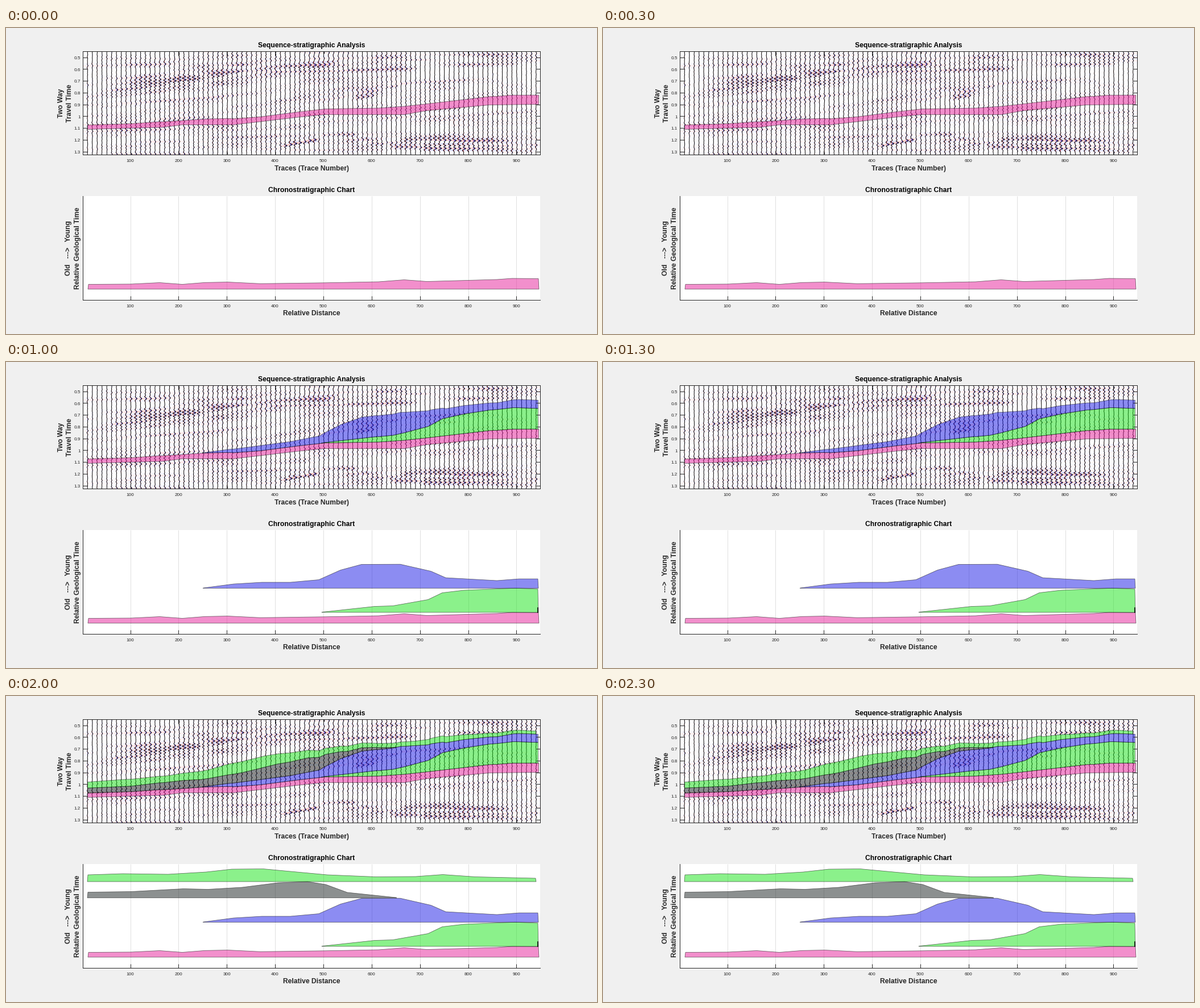
These frames come from a looping animation (1039x539 px, 2.5 s). A matplotlib script:

```python
import numpy as np
import matplotlib.pyplot as plt
from matplotlib.animation import FuncAnimation

W, H, DPI = 1039, 539, 64
PT = 72 / DPI  # points per pixel
INK = "#262626"
LEFT, RIGHT = 135, 939
SECTION_Y, CHART_Y = (41, 223), (296, 479)
X_TICKS = 218.5 + 84.87 * np.arange(9)
Y_TICKS = 51.5 + 20.75 * np.arange(9)
CHART_SCALE = 1.13  # chart height per pixel of section thickness

plt.rcParams["font.family"] = "Liberation Sans"
fig = plt.figure(figsize=(W / DPI, H / DPI), dpi=DPI, facecolor="#f0f0f0")
rng = np.random.default_rng(7)


def panel(top, bottom):
    """Axes whose data coordinates are stage pixels."""
    ax = fig.add_axes([LEFT / W, 1 - bottom / H, (RIGHT - LEFT) / W, (bottom - top) / H])
    ax.set(xlim=(LEFT, RIGHT), ylim=(bottom, top), xticks=X_TICKS, yticks=[])
    ax.set_autoscale_on(False)
    ax.set_axisbelow(False)
    ax.tick_params(direction="in", length=7.5 * PT, width=PT, color=INK,
                   labelbottom=False, labelleft=False)
    for spine in ax.spines.values():
        spine.set(color=INK, linewidth=PT)
    return ax


def label(x, y, text, size=12.12, color=INK, weight="bold", ha="center", rotation=0):
    fig.text(x / W, 1 - y / H, text, fontsize=size * PT, color=color, weight=weight,
             ha=ha, va="baseline", rotation=rotation, rotation_mode="anchor")


section = panel(*SECTION_Y)
section.set_yticks(Y_TICKS)
section.tick_params(top=True, right=True)
chart = panel(*CHART_Y)
chart.spines[["top", "right"]].set_visible(False)
chart.vlines(X_TICKS, *CHART_Y, color="#dfdfdf", lw=PT, zorder=0.5)

label(537.5, 34, "Sequence-stratigraphic Analysis", color="black")
label(537.5, 251, "Traces (Trace Number)")
label(537.5, 289, "Chronostratigraphic Chart", color="black")
label(537.5, 506.5, "Relative Distance")
label(100, 132.5, "Two Way", rotation=90)
label(114.8, 132.5, "Travel Time", rotation=90)
label(113.3, 387.5, "Old   --->   Young", rotation=90)
label(128.5, 387.5, "Relative Geological Time", rotation=90)
for i, (x, y) in enumerate(zip(X_TICKS, Y_TICKS)):
    for baseline in (235.6, 491.6):
        label(x, baseline, f"{100 * (i + 1)}", 8.1, weight="normal")
    label(131, y + 3.4, f"{0.5 + 0.1 * i:.2g}", 8.1, weight="normal", ha="right")


def spread_reflectors(count, start, end, scatter, strength):
    """Short parallel reflectors strewn along the line from start to end."""
    (x0, y0), (x1, y1) = start, end
    slope = (y1 - y0) / (x1 - x0)
    for _ in range(count):
        half = (x1 - x0) * rng.uniform(0.15, 0.4)
        x = rng.uniform(x0 + half, x1 - half)
        y = y0 + slope * (x - x0) + rng.uniform(-scatter, scatter)
        yield x, y, half, slope, strength * rng.uniform(0.6, 1.1)


reflectors = [
    *spread_reflectors(16, (130, 112), (450, 76), 16, 0.42),
    *spread_reflectors(9, (390, 77), (740, 70), 9, 0.4),
    *spread_reflectors(3, (500, 65), (600, 61), 4, 0.6),
    *spread_reflectors(5, (580, 123), (700, 106), 6, 0.65),
    *spread_reflectors(4, (460, 214), (570, 191), 4, 0.6),
    *spread_reflectors(4, (550, 189), (690, 206), 4, 0.45),
    *spread_reflectors(12, (670, 204), (950, 207), 9, 0.55),
]
for _ in range(300):
    y = rng.uniform(*SECTION_Y)
    dip = -0.07 * np.exp(-((y - 125) / 50) ** 2)
    reflectors.append((rng.uniform(LEFT, RIGHT), y, rng.uniform(20, 100), dip,
                       rng.uniform(0.08, 0.3)))


def amplitude(x, y):
    """Reflection strength on the grid of columns x and rows y."""
    total = np.zeros((len(y), len(x)))
    for cx, cy, half, slope, strength in reflectors:
        offset = y[:, None] - cy - slope * (x - cx)
        taper = np.clip((half - abs(x - cx)) / 12, 0, 1)
        total += strength * taper * np.exp(-(offset / 4) ** 2) * np.cos(0.9 * offset)
    return np.clip(total, -0.9, 0.9)


rows = np.arange(SECTION_Y[0], SECTION_Y[1] + 0.5, 0.5)
columns = np.arange(LEFT, RIGHT) + 0.5
section.imshow(amplitude(columns, rows), cmap="bwr", vmin=-1, vmax=1, alpha=0.3,
               extent=(LEFT, RIGHT, SECTION_Y[1], SECTION_Y[0]), aspect="auto", zorder=0.5)

traces = np.arange(143.3, RIGHT, 8.48)
for x, swing in zip(traces, amplitude(traces, rows).T):
    jitter = np.convolve(rng.normal(0, 0.45, len(rows)), np.hanning(9) / 4, "same")
    line = x + 4 * swing + jitter
    section.fill_betweenx(rows, x, line, where=line < x, color="#ff3030", alpha=0.6, lw=0)
    section.fill_betweenx(rows, x, line, where=line > x, color="#3030ff", alpha=0.6, lw=0)
    section.plot(line, rows, color="black", lw=0.95 * PT, zorder=1.2)

# Depth of the lowest horizon, then the chart thickness of each unit above it
base_horizon = [(143, 178), (275, 174.5), (310, 170), (400, 170), (510, 157), (560, 152),
                (700, 152), (740, 145), (850, 135), (936, 134)]
units = [
    ("#e7219b", 460, [(145, 8.5), (220, 9), (270, 11.5), (310, 8.5), (350, 11.7), (390, 12.5),
                      (447, 9.7), (560, 11.2), (655, 13), (700, 16.5), (740, 13.5),
                      (863, 17), (890, 19), (936, 18.5)]),
    ("#18e418", 441, [(556, 0.5), (648, 10.5), (680, 11.5), (742, 22.5), (767, 34.5),
                      (805, 39), (895, 42.7), (935, 41)]),
    ("#1a1ae6", 398.5, [(347, 0.5), (400, 7.5), (450, 10.5), (500, 10.5), (550, 15),
                        (588, 32), (625, 42), (693, 42.3), (747, 30), (773, 18.5),
                        (863, 13.5), (902, 16.5), (935, 16.5)]),
    ("#1a2323", 355.5, [(144, 10), (220, 11), (312, 16), (355, 15), (415, 18.5), (478, 26.5),
                        (530, 28.5), (562, 23.5), (600, 9.5), (686, 0.5)]),
    ("#18e418", 327, [(144, 12), (205, 14), (285, 13), (352, 17), (397, 22), (452, 22.5),
                      (565, 12), (650, 8.5), (720, 9), (768, 12.5), (825, 8.5), (931, 6)]),
]

xs = np.arange(143, 937)
surface = np.interp(xs, *np.transpose(base_horizon))
layers = []
for color, baseline, profile in units:
    style = dict(facecolor=(color, 0.5), edgecolor=("black", 0.55), linewidth=0.8 * PT,
                 zorder=1.4)
    px, thickness = np.transpose(profile)
    inside = (xs >= px[0] - 2) & (xs <= px[-1])
    top = surface - np.where(inside, np.interp(xs, px, thickness), 0) / CHART_SCALE
    body = section.fill_between(xs[inside], top[inside], surface[inside], **style)
    shape, = chart.fill([px[0] - 1, *px, px[-1] + 1],
                        [baseline, *(baseline - thickness), baseline], **style)
    layers.append([body, shape])
    surface = top

# Dark sliver where the second unit pinches against the right edge
layers[1] += chart.plot([934.8, 934.8], [433, 441], color="black", lw=1.6 * PT)


def update(step):
    for i, layer in enumerate(layers):
        for artist in layer:
            artist.set_visible(i <= step)
    return []


anim = FuncAnimation(fig, update, frames=len(units), interval=500, repeat=True,
                     repeat_delay=0, blit=False)
plt.show()
```
